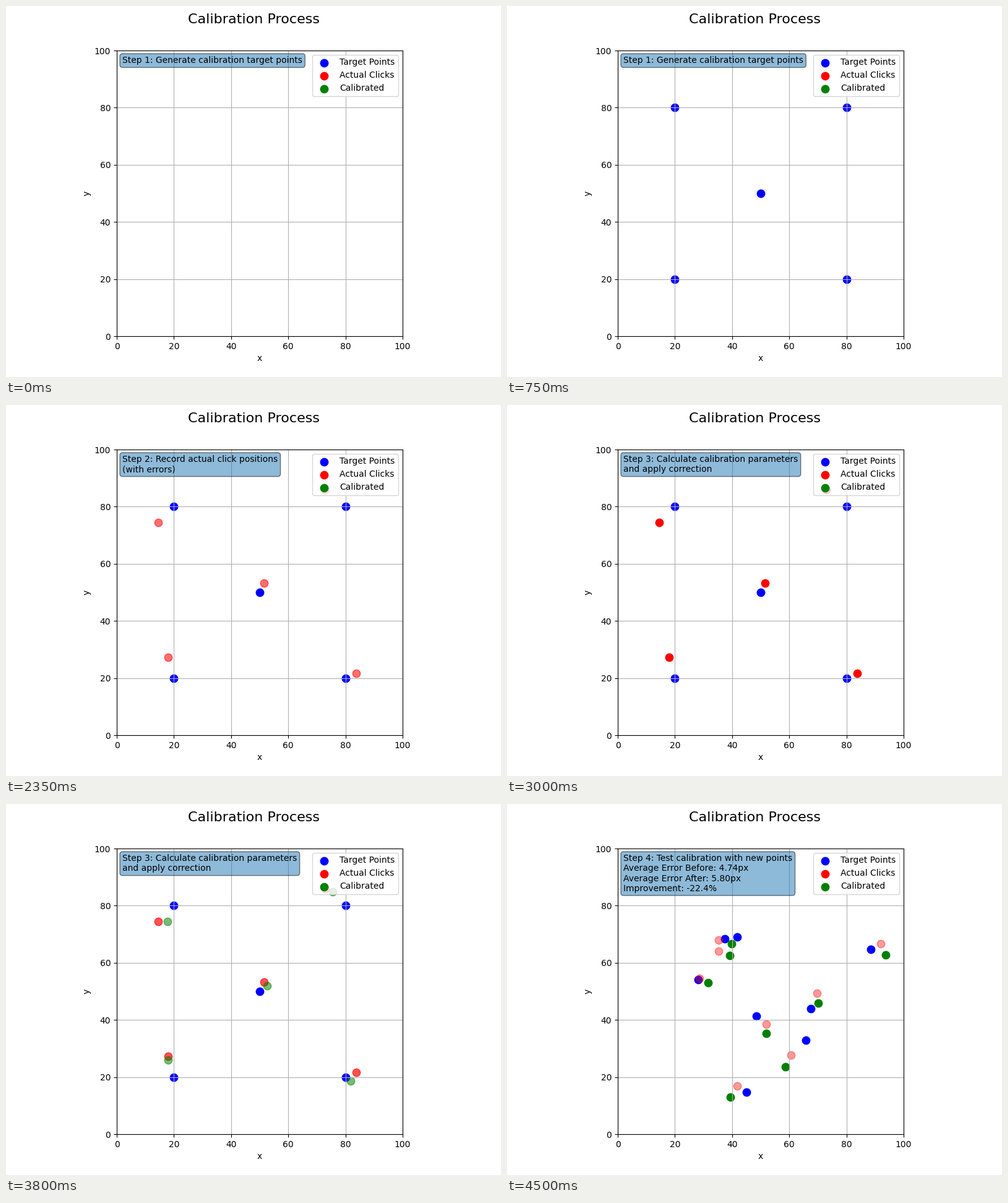
Recreate the animation shown at these times as a matplotlib script. Size 800 px wide and 600 px high, loop 6000 ms.

```python
import numpy as np
import matplotlib.pyplot as plt
from matplotlib.animation import FuncAnimation

PHASE = 30  # frames per step
FRAMES = 4 * PHASE
NOISE = 8


def affine_fit(src, dst):
    """Least-squares affine map from src to dst."""
    def pad(p):
        return np.column_stack([p, np.ones(len(p))])
    coef = np.linalg.lstsq(pad(src), dst, rcond=None)[0]
    return lambda p: pad(p) @ coef


def mean_error(a, b):
    return np.hypot(*(a - b).T).mean()


# Calibration points and their noisy clicks
targets = np.array([[20, 20], [80, 20], [20, 80], [80, 80], [50, 50]], float)
np.random.seed(42)
clicks = targets + np.random.uniform(-NOISE, NOISE, targets.shape)
correct = affine_fit(clicks, targets)
corrected = correct(clicks)

# Fresh points for the final test
np.random.seed(123)
test_targets = np.random.uniform(10, 90, (8, 2))
test_clicks = test_targets + np.random.uniform(-NOISE, NOISE, test_targets.shape)
test_corrected = correct(test_clicks)
before = mean_error(test_clicks, test_targets)
after = mean_error(test_corrected, test_targets)

NOTES = [
    "Step 1: Generate calibration target points",
    "Step 2: Record actual click positions\n(with errors)",
    "Step 3: Calculate calibration parameters\nand apply correction",
    "Step 4: Test calibration with new points\n"
    f"Average Error Before: {before:.2f}px\n"
    f"Average Error After: {after:.2f}px\n"
    f"Improvement: {(before - after) / before * 100:.1f}%",
]

fig, ax = plt.subplots(figsize=(8, 6), dpi=100)
fig.suptitle("Calibration Process", fontsize=16)
ax.set(xlim=(0, 100), ylim=(0, 100), xlabel="x", ylabel="y", aspect="equal")
ax.grid(True)

blue, red, green = [
    ax.scatter([], [], c=color, s=80, label=label)
    for color, label in [("blue", "Target Points"),
                         ("red", "Actual Clicks"),
                         ("green", "Calibrated")]
]
ax.legend(loc="upper right")
note = ax.text(0.02, 0.98, "", transform=ax.transAxes, va="top",
               bbox=dict(boxstyle="round", alpha=0.5))


def show(dots, points, alpha):
    dots.set_offsets(points)
    dots.set_alpha(alpha)


def update(frame):
    step, k = divmod(frame, PHASE)
    t = k / PHASE
    note.set_text(NOTES[step])
    if step == 3:
        show(blue, test_targets, 1)
        show(red, test_clicks, 0.4)
        show(green, test_corrected, 1)
    else:
        show(blue, targets, min(1, 2 * t) if step == 0 else 1)
        show(red, clicks, (0, t, 1 - 0.6 * t)[step])
        show(green, clicks + t * (corrected - clicks), t if step == 2 else 0)
    return blue, red, green, note


anim = FuncAnimation(fig, update, frames=FRAMES, interval=50,
                     repeat=True, repeat_delay=0)
plt.show()
```
